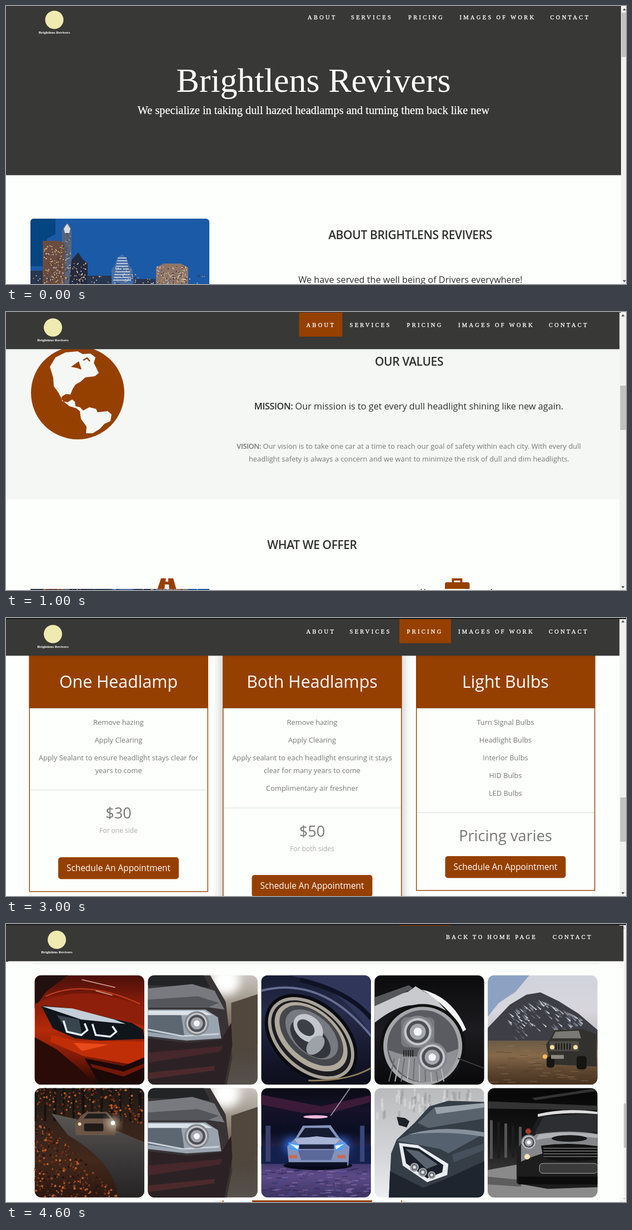
Recreate the animation shown at these times as an HTML page. Size 1116 px wide and 502 px high, loop 5 s.

```html
<!DOCTYPE html>
<html lang="en">
<head>
<meta charset="utf-8">
<title>Brightlens Revivers</title>
<style>
  html, body { margin: 0; width: 100%; height: 100%; overflow: hidden; background: #fdfffc; }
  svg { display: block; width: 100%; height: 100%; }
  text { font-family: "Open Sans", "Noto Sans", sans-serif; white-space: pre; }
  .serif { font-family: "Liberation Serif", "Noto Serif", serif; }
  .nav { letter-spacing: 3.3px; stroke: #fff; stroke-width: .3px; }
  .title { font-weight: 600; letter-spacing: -.4px; }
  .strong { font-weight: 600; letter-spacing: -.4px; }
</style>
</head>
<body>
<svg id="stage" viewBox="0 0 1116 502">
  <defs>
    <clipPath id="tile"><rect width="197.5" height="197.5" rx="12"/></clipPath>
    <clipPath id="city"><rect x="44" y="384" width="322" height="140" rx="6"/></clipPath>
    <clipPath id="box1"><rect y="1" width="1116" height="499"/></clipPath>
    <clipPath id="box4"><rect x="4" y="3" width="1108" height="496"/></clipPath>
    <filter id="soft" x="-50%" y="-50%" width="200%" height="200%"><feGaussianBlur stdDeviation="8"/></filter>
  </defs>
</svg>
<script>
const BRAND = 'Brightlens Revivers';
const PAGE = '#fdfffc', PANEL = '#f5f7f5', DARK = '#383836', RUST = '#964000', INK = '#2f2f2f', GREY = '#777';
const STEP = 1000;
const SOFT = 'filter="url(#soft)"';

let seed = 7;
const random = () => (seed = seed * 16807 % 2147483647) / 2147483647;
const pick = list => list[Math.floor(random() * list.length)];
const repeat = (n, draw) => Array.from({ length: n }, (_, i) => draw(i)).join('');

const rect = (x, y, w, h, fill, extra = '') =>
  `<rect x="${x}" y="${y}" width="${w}" height="${h}" fill="${fill}" ${extra}/>`;
const circle = (x, y, r, fill, extra = '') => `<circle cx="${x}" cy="${y}" r="${r}" fill="${fill}" ${extra}/>`;
const oval = (x, y, rx, ry, fill, extra = '') =>
  `<ellipse cx="${x}" cy="${y}" rx="${rx}" ry="${ry}" fill="${fill}" ${extra}/>`;
const path = (d, fill, extra = '') => `<path d="${d}" fill="${fill}" ${extra}/>`;
const line = (d, color, width) => path(d, 'none', `stroke="${color}" stroke-width="${width}"`);
const text = (x, y, size, fill, str, extra = 'text-anchor="middle"') =>
  `<text x="${x}" y="${y}" font-size="${size}" fill="${fill}" ${extra}>${str}</text>`;
const title = (x, y, str) => text(x, y, 21, INK, str, 'class="title" text-anchor="middle"');
const lead = (x, y, str) => text(x, y, 16.25, INK, str);
const small = (x, y, str) => text(x, y, 12.85, GREY, str);

let fades = 0;
function fade(...colors) {
  const id = 'fade' + fades++;
  const stops = colors.map((c, i) => `<stop offset="${i / (colors.length - 1)}" stop-color="${c}"/>`).join('');
  document.querySelector('defs').insertAdjacentHTML('beforeend',
    `<linearGradient id="${id}" x2="0" y2="1">${stops}</linearGradient>`);
  return `url(#${id})`;
}

// Page furniture
const logo = (x, y) => circle(x, y, 16.5, '#efeab0') +
  text(x, y + 24.5, 6.7, '#fff', BRAND, 'class="serif" font-weight="bold" text-anchor="middle"');

const navText = (x, y, str) => text(x, y, 10.5, '#fff', str, 'class="serif nav"');

function nav(x, y) {
  const items = [['ABOUT', 0], ['SERVICES', 78], ['PRICING', 181], ['IMAGES OF WORK', 273.5], ['CONTACT', 436.5]];
  return items.map(([label, dx]) => navText(x + dx, y, label)).join('');
}

// Sticky header; active is [x, width] of the highlighted item
const header = (top, bottom, [x, width]) =>
  rect(0, bottom, 1104.5, 2, '#0001') + rect(0, top, 1104.5, bottom - top, DARK) +
  rect(x, top, width, bottom - top - 22.5, RUST) +
  logo(84.5, bottom - 39) + nav(540.5, bottom - 40);

const scrollbar = (x, thumb) => rect(x, 0, 12, 502, '#f1f1f1') + rect(x + 1, thumb, 11, 80, '#c1c1c1') +
  path(`M${x + 3} 8l3-4 3 4z`, '#555') + path(`M${x + 3} 495l3 4 3-4z`, '#555');

// Scenes
function skyline() {
  const lights = (x, y, w, h, n) =>
    repeat(n, () => rect(x + random() * w, y + random() * h, 1.8, 1.8, pick(['#e3bd84', '#b98a5c', '#c9cedb', '#35303c'])));
  return `<g clip-path="url(#city)">` +
    rect(44, 384, 322, 140, '#1b5aa7') + path('M44 384h45v28l-15 8-8 50H44z', '#044582') +
    path('M101 502V405l5-9 5-4 5 6 2 10v94z', '#56657c') + lights(102, 410, 14, 90, 40) +
    path('M104 402l6-9 6 9-2 8h-8z', '#d6dde2') +
    path('M66 502V424h30l10 5v73z', '#6a4c40') + lights(67, 432, 36, 70, 130) +
    path('M114 502l4-43 12-14 8 12 9 8v37z', '#242a3f') + lights(118, 462, 25, 40, 45) +
    path('M44 502v-24h22v24zM146 502v-15h46v15zM231 502v-9h38v9z', '#28364f') +
    path('M190 502v-26l5-7 5-14 9-7 8 7 5 14 6 7v26z', '#476da5') +
    repeat(9, i => rect(201 - i, 454 + i * 5, 16 + i * 2, 2, '#b9c9df')) + lights(194, 470, 33, 32, 30) +
    path('M270 502v-30l14-7h30l14 7v30z', '#8d7568') + lights(271, 469, 54, 33, 130) +
    lights(48, 484, 310, 18, 70) + '</g>';
}

const home = () =>
  rect(0, 0, 1116, 502, PAGE) + rect(0, 0, 1107, 305.5, DARK) + logo(87, 25) + nav(543, 24) +
  text(553.5, 155, 62, '#fff', BRAND, 'class="serif" text-anchor="middle"') +
  text(553.5, 195, 20.4, '#fff', 'We specialize in taking dull hazed headlamps and turning them back like new',
    'class="serif" text-anchor="middle" stroke="#fff" stroke-width=".25"') +
  skyline() + title(727.5, 421, 'ABOUT ' + BRAND.toUpperCase()) +
  lead(728, 500, 'We have served the well being of Drivers everywhere!') + scrollbar(1107, 12);

const globe = () => circle(129, 146, 84, RUST) +
  path('M79 99l10-17 18-9 22-2 9 5 14-1 9 7-3 10 9 18-7 6-17 2-9 8-9 5-5 8-4 10-8-1-8 5 1 8 10 2 8-5 5 4 1 8 8 2 8 8' +
    '-5 2-9-8-13-4-12-10-8-15-8-11-1-15z', PANEL) +
  path('M133 181l17-9 12 3 3 6 18-2 7 6-2 12-11 5-8 9-13 8-12 0 1-12-10-14z', PANEL) +
  path('M117 99l14-10 5 15-9-3z', RUST) + line('M139 87l7-4 5 6', RUST, 2.5);

const about = () =>
  rect(0, 0, 1116, 502, PAGE) + rect(0, 67, 1105, 271.5, PANEL) + globe() + header(1, 67, [527.5, 78]) +
  title(725.5, 97, 'OUR VALUES') +
  lead(725, 176, '<tspan class="strong">MISSION:</tspan> Our mission is to get every dull headlight shining like new again.') +
  small(725, 247, '<tspan class="strong">VISION:</tspan> Our vision is to take one car at a time to reach our goal of safety within each city. With every dull') +
  small(725.5, 270, 'headlight safety is always a concern and we want to minimize the risk of dull and dim headlights.') +
  title(551, 428, 'WHAT WE OFFER') +
  path('M279 481h22l6 21h-35z', RUST) + path('M288 481h4v6h-5zM286 492h7l1 10h-9z', PAGE) +
  rect(790, 488, 44.5, 20, RUST, 'rx="4"') + line('M804.5 488v-5h15v5', RUST, 4) + scrollbar(1104.5, 133);

const CARDS = [41.5, 390, 738];

function services() {
  const chevron = (x, dx) => line(`M${x} 164.5l${dx} 10 ${-dx} 10`, '#0002', 8) +
    line(`M${x} 164l${dx} 10 ${-dx} 10`, '#c99c7c', 7);
  const ring = x => circle(x, 259, 4, 'none', `stroke="${RUST}" stroke-width="1.3"`);
  return rect(0, 0, 1116, 502, PAGE) + rect(0, 65, 1105, 232.5, PANEL) + header(0, 65, [605.5, 102]) +
    title(551, 100, 'WHAT OUR CUSTOMERS SAY') + chevron(89, -10) + chevron(1013, 10) +
    text(552, 208, 17, INK, '"One word... WOW!!" My headlights are so clear!', 'font-style="italic" text-anchor="middle"') +
    lead(551, 231, 'Colin Varbrook') + ring(537.5) + circle(551, 259, 5.3, RUST) + ring(564.5) +
    title(551, 387, 'PRICING') + lead(551, 434, 'We have plans for all our customers') +
    CARDS.map(x => rect(x, 466, 322.5, 40, RUST)).join('') + scrollbar(1104.5, 256);
}

function card(x, name, lines, rule, price, note, button, bottom) {
  const mid = x + 161;
  return rect(x + .75, 60, 321, bottom - 60, PAGE, `stroke="${RUST}" stroke-width="1.4"`) +
    rect(x, 60, 322.5, 103, RUST) + text(mid, 126, 30.3, '#fff', name) +
    lines.map(([y, str]) => small(mid, y, str)).join('') +
    rect(x + 1.5, rule, 319.5, 1, '#ddd') + text(mid, rule + 52, 27.2, GREY, price) +
    text(mid, rule + 78, 12, '#aaa', note) +
    rect(mid - 108.5, button, 217, 39.5, RUST, 'rx="5"') + text(mid, button + 25, 15.4, '#fff', 'Schedule An Appointment');
}

function pricing() {
  const bulbs = ['Turn Signal', 'Headlight', 'Interior', 'HID', 'LED'].map((s, i) => [193 + i * 32, s + ' Bulbs']);
  const basics = [[193, 'Remove hazing'], [225, 'Apply Clearing']];
  return rect(0, 0, 1116, 502, PAGE) + rect(386, 60, 330, 460, '#0003', SOFT) +
    card(CARDS[0], 'One Headlamp', [...basics, [257, 'Apply Sealant to ensure headlight stays clear for'],
      [280, 'years to come']], 310, '$30', 'For one side', 432, 494) +
    card(CARDS[1], 'Both Headlamps', [...basics, [257, 'Apply sealant to each headlight ensuring it stays'],
      [280, 'clear for many years to come'], [312, 'Complimentary air freshner']], 342.5, '$50', 'For both sides', 464, 526) +
    card(CARDS[2], 'Light Bulbs', bulbs, 351, 'Pricing varies', '', 430, 492) +
    header(2, 68, [708, 93]) + scrollbar(1104.5, 324) + rect(0, 0, 1116, 2, '#1c1c1c');
}

// Gallery pictures, each drawn in a 198 px square
const sky = (...colors) => rect(0, 0, 198, 198, fade(...colors));
const lamp = (x, y, r) => circle(x, y, r, '#85878b') + circle(x, y, r * .85, '#c4c6ca') +
  circle(x, y, r * .7, '#4d4f55') + circle(x, y, r * .5, '#a4a7ad') + circle(x, y, r * .25, '#f5f6f8');

const redCar = () => sky('#4a1009', '#861b0a', '#b42a08', '#7c1a07', '#1c0806') +
  path('M0 0h60L20 30 0 60z', '#21100f') + path('M0 52Q90 10 198 60v32L150 78 0 60z', '#8e1f0b') +
  line('M20 38Q90 5 190 52', '#c0401f', 2) + line('M85 8l60 14M110 28l30 8', '#d9a99c', 1.5) +
  path('M12 55l48 4 75 18 40 9 20 12 3 17-80 3-45-4-40-18z', '#10151c') +
  path('M13 56l55 4 76 20 20 8-80-8z', '#c3ced8') + path('M40 72l40 8 5 26-25-4z', '#38454f') +
  line('M52 82l6 20 26 6 11-9-5-12M104 88l6 20 26 3 11-9-7-10', '#e4f5ff', 3.5) +
  path('M30 108l45 10 123 2v34l-30 6-80-14-60-26z', '#c02e07') + path('M70 122l65 3-50 12z', '#e84a1b') +
  path('M0 112l40 22 40 34 30 30H0z', '#2a0b07') + path('M90 150l70 14 38-16v50h-80z', '#1b0807') +
  path('M100 160l60 14 38-15v7l-38 17-55-16z', '#701707');

const greyCar = () => sky('#c9c4bc', '#8d8477', '#4f463d', '#57514c') +
  circle(140, 10, 26, '#fff', SOFT) + path('M150 50l48-16v90l-48 20z', '#51473d') +
  path('M0 0h112l28 48 12 100-10 50H0z', '#383436') + path('M0 0h100l12 22L0 18z', '#232426') +
  path('M0 24l80-8 40 12 18 34-28-4H0z', '#797a80') + path('M0 44l90-6 38 12-20 8H0z', '#55565c') +
  path('M0 62h104l22 14 6 38-62 4L0 110z', '#9aa4b0') + path('M0 70l60 2 6 40-66-10z', '#5d6772') +
  path('M0 64h100l16 8H0z', '#dbe3ea') + line('M0 98l62 12 66-4', '#c8d0d8', 3) + lamp(88, 87, 22) +
  path('M0 114l70 8 62-6 18-30 2 40-14 72H0z', '#2c2225') + path('M0 140l135-12-5 10L0 158z', '#46272b') +
  path('M0 176l120-12v8L0 188z', '#4c2a2b');

const roundLamp = () => sky('#171c34', '#272c4a', '#171a30', '#0c0e1b') +
  path('M50 0h148v110Q150 20 50 0z', '#30365a') + line('M0 28Q110 0 198 110', '#666d94', 4) + line('M70 8q90 22 128 70', '#0f1224', 8) +
  '<g transform="rotate(42 90 114)">' + oval(90, 114, 96, 65, '#0a0b10') + oval(90, 114, 90, 59, '#a8a298') +
  oval(90, 114, 84, 53, '#1d1d21') + oval(88, 112, 77, 48, '#b0a99c') + oval(87, 110, 68, 41, '#46474c') +
  oval(86, 108, 56, 34, '#777a80') + oval(90, 116, 44, 24, '#34363c') + oval(74, 104, 30, 22, '#c3c7cd') +
  oval(70, 106, 18, 12, '#3d4048') + oval(104, 118, 13, 20, '#9da1a8') + '</g>' + line('M85 190q70 2 112-22', '#8b7a58', 3);

const twinLamp = () => sky('#0b0b0d', '#1c1c20', '#09090b') +
  path('M0 46L60 30 74 20 110 42 160 100l-9 4Q100 54 70 54T0 86z', '#c9cacd') + path('M0 40l62-22 8 6L0 56z', '#55565a') +
  path('M85 26q55 12 80 72l-6 4q-20-42-74-76z', '#f3f3f4') +
  oval(87, 128, 77, 76, '#111') + oval(87, 128, 71, 71, '#a5a6a9') + oval(87, 128, 64, 65, '#5a5c61') +
  path('M25 135q60 25 126-2-10 62-62 60-50-4-64-58z', '#8f9094') +
  repeat(10, i => line(`M${36 + i * 9} 150l${(i - 5) * 2} 42`, i % 2 ? '#b6b7ba' : '#6d6e72', 2)) +
  rect(48, 76, 60, 54, '#77797e', 'rx="10"') + lamp(78, 102, 29) + lamp(104, 148, 27) +
  repeat(5, i => rect(52 + i * 4, 135, 2, 12, '#222')) + line('M150 150l48 18', '#3a3a3e', 2);

const jeep = () => sky('#d0d3dd', '#d8d6dc', '#b5afb0', '#6d543b') + path('M0 0h75L50 30 20 50 0 75z', '#8da2c3') +
  path('M0 95l40-42 30-18 25-4 33 16 35 22 35 30v35H0z', '#3d3e46') +
  repeat(130, () => {
    const x = 35 + random() * 130, y = 42 + Math.abs(x - 90) * .45 + random() ** 2 * 55;
    return path(`M${x} ${y}l9 6-2 2z`, pick(['#c8ccd6', '#8f93a0', '#5f626d']));
  }) +
  rect(0, 118, 198, 80, fade('#6b5b47', '#85694a', '#5f4731', '#46321f')) +
  repeat(80, () => rect(random() * 198, 122 + random() * 76, 14, 1.2, pick(['#9a7d58', '#4b3825']), 'opacity=".5"')) +
  path('M105 125l8-12 8-14 50-2 25 10v58l-84-4z', '#33312e') +
  path('M122 102l42-2 4 14h-52z', '#7b7973') + rect(111, 119, 53, 18, '#4f4c46') +
  repeat(6, i => rect(122 + i * 5, 123, 2, 11, '#191816')) + circle(116, 130, 4, '#ffe0a4') + circle(158, 130, 4, '#ffe0a4') +
  circle(103, 147, 4, '#ffbc5d') + rect(106, 147, 14, 20, '#161513', 'rx="5"') + rect(160, 146, 18, 24, '#161513', 'rx="5"') +
  rect(114, 144, 23, 7, '#8d8980');

const autumn = () => sky('#1d1917', '#35231a', '#43281b', '#2a1711') +
  repeat(12, i => rect(i * 17, 0, 3 + i % 3, 60, '#15110f')) +
  path('M30 46l45 10 75 22 48 20v100h-48Q145 135 60 85z', fade('#5a5653', '#3c3a3a', '#252323')) +
  repeat(1100, () => {
    const x = random() * 198, y = random() * 198;
    const onBank = y < 40 + x * .12 || x < 12 + (y - 55) * .98;
    return onBank ? circle(x, y, .8 + random() * 1.5, pick(['#8f401c', '#6b2b14', '#b85f2a', '#3f1a0f', '#241410'])) : '';
  }) +
  path('M72 66l11-16 11-7h36l12 14 5 10-2 18H74z', '#6b5546') + path('M88 55l8-9h32l9 9z', '#201d1d') +
  rect(89, 64, 35, 14, '#211b18', 'rx="3"') + circle(141, 63, 9, '#fff0d7', SOFT) +
  circle(141, 63, 4, '#fff') + circle(81, 65, 3, '#f3ddba');

const neon = () => sky('#0b0b14', '#15122a', '#0a0e22', '#2e2a58', '#5c4a86', '#3c3360') +
  path('M0 30l75 15h50l73-20v-12l-90 20L0 12z', '#3c1b38') + oval(98, 52, 22, 3, '#f3b9dd') + line('M125 50L160 0', '#a7a1b7', 1.5) +
  rect(0, 105, 198, 32, '#14204c') + rect(8, 68, 9, 65, '#39406b') + rect(178, 68, 8, 65, '#39467a') +
  repeat(160, () => rect(random() * 198, 144 + random() * 54, 10, 2, pick(['#8a72b4', '#4a4a90', '#2b2850']), 'opacity=".55"')) +
  oval(102, 140, 62, 8, '#070a18') + circle(56, 104, 14, '#2f6fe8', SOFT) + circle(144, 104, 14, '#2f6fe8', SOFT) +
  path('M47 105l15-15 13-22 50-1 16 23 18 16-2 34H50z', '#8493bc') + path('M67 89l12-17h43l13 17z', '#151b30') +
  path('M60 92l40-5 42 5-8 9H66z', '#a9b5d6') + rect(68, 102, 63, 8, '#1d2540') + path('M66 112h66l-6 18H72z', '#5a689a') +
  path('M49 98l20 3-2 13-15-4zM152 98l-20 3 2 13 15-4z', '#4c9fff') + path('M52 101l16 3-2 7zM149 101l-16 3 2 7z', '#e6faff') +
  rect(50, 121, 15, 6, '#c76a58') + rect(137, 121, 15, 6, '#c76a58') + rect(48, 134, 107, 7, '#0c1023');

const sleek = () => sky('#b9babc', '#c9cacc', '#d6d8dc', '#eceef2') +
  repeat(60, () => rect(random() * 198, random() * 45, 4, 14, pick(['#e4e4e5', '#98999c']), 'opacity=".5"')) +
  path('M73 62l26-29 34-10 65 2v173H26l4-80 10-25z', '#353d47') + path('M78 63l30-28 90-6v26L97 72z', '#59636e') +
  path('M108 35l90-8v8l-86 12z', '#9aa3ac') + path('M40 52l15 2 8 6-5 11-14-4z', '#1d2229') +
  path('M40 95Q95 62 198 82l-65 36-15-8z', '#55616e') + path('M60 84q60-18 138-4v8q-70-12-138-4z', '#86919c') +
  path('M44 99l34 4 55 34-2 20-36 13-44-30z', '#e9edf1') + path('M51 105l29 4 44 30-2 13-27 11-38-27z', '#1a2029') +
  path('M56 110l24 4 34 24-20 8z', '#5a6470') + lamp(72, 143, 8) + lamp(87, 152, 8) + lamp(103, 157, 7) +
  path('M28 150l60 30 45-18 65-30v66H26z', '#1e252e') + path('M140 120l58-20v12l-56 22z', '#45505c');

const compact = () => sky('#060606', '#0e0e0e', '#181818', '#343434', '#777') +
  path('M0 24l198 8v8L0 37zM80 18L198 0v5L85 22z', '#333') +
  repeat(5, i => rect(4 + i * 13, 58 + i * 3, 5, 70 - i * 4, i % 2 ? '#1d1d1d' : '#555')) +
  path('M0 148l70-13 128 40v23H0z', '#8a8a8a') + path('M0 160l60 6v12L0 174z', '#5d5d5d') +
  path('M52 172V110l20-22 22-41 104-4v136l-90 3z', '#1d1d1d') +
  path('M84 82l17-31 97-5v33z', '#2c2e31') + path('M90 47q50-12 108-4v4q-60-5-108 5z', '#ddd') +
  path('M60 103l28-20q60-9 110 0v30q-70-12-138 20z', '#85878b') + path('M92 84q50-8 106 0v6q-60-7-112 4z', '#b0b2b5') +
  oval(147, 91, 32, 6, '#1a1a1a') + path('M96 104q50-7 102 1v23q-60 9-98-2z', '#111') +
  repeat(4, i => rect(100, 108 + i * 5, 98, 1.5, '#777')) + lamp(74, 98, 14) + circle(71, 124, 5, '#ffe5b8') +
  circle(73, 78, 5, '#a83b27') + rect(93, 136, 105, 18, '#3a3a3a', 'rx="6" stroke="#aaa"') + rect(55, 160, 143, 14, '#0c0c0c');

const gallery = () => rect(0, 0, 1116, 502, PAGE) + rect(0, 67, 1111.5, 1, '#0003') + rect(0, 0, 1111.5, 67, DARK) +
  logo(91.5, 28.5) + navText(792, 27, 'BACK TO HOME PAGE') + navText(984, 27, 'CONTACT') + rect(48, 71, 1020, 1.5, '#ececec') +
  [redCar, greyCar, roundLamp, twinLamp, jeep, autumn, greyCar, neon, sleek, compact].map((draw, i) =>
    `<g transform="translate(${51.5 + i % 5 * 203.9} ${92.5 + Math.floor(i / 5) * 203.7})" clip-path="url(#tile)">${draw()}</g>`).join('');

// Scenes stack up, so clipped ones leave the edges of the scene below visible
const clips = { 1: 'clip-path="url(#box1)"', 4: 'clip-path="url(#box4)"' };
const stage = document.getElementById('stage');
const scenes = [home, about, services, pricing, gallery].map((draw, i) => {
  stage.insertAdjacentHTML('beforeend', `<g ${clips[i] || ''}>${draw()}</g>`);
  return stage.lastElementChild;
});

function render() {
  const current = Math.floor(performance.now() / STEP) % scenes.length;
  scenes.forEach((scene, i) => { scene.style.display = i <= current ? '' : 'none'; });
  requestAnimationFrame(render);
}
render();
</script>
</body>
</html>
```
